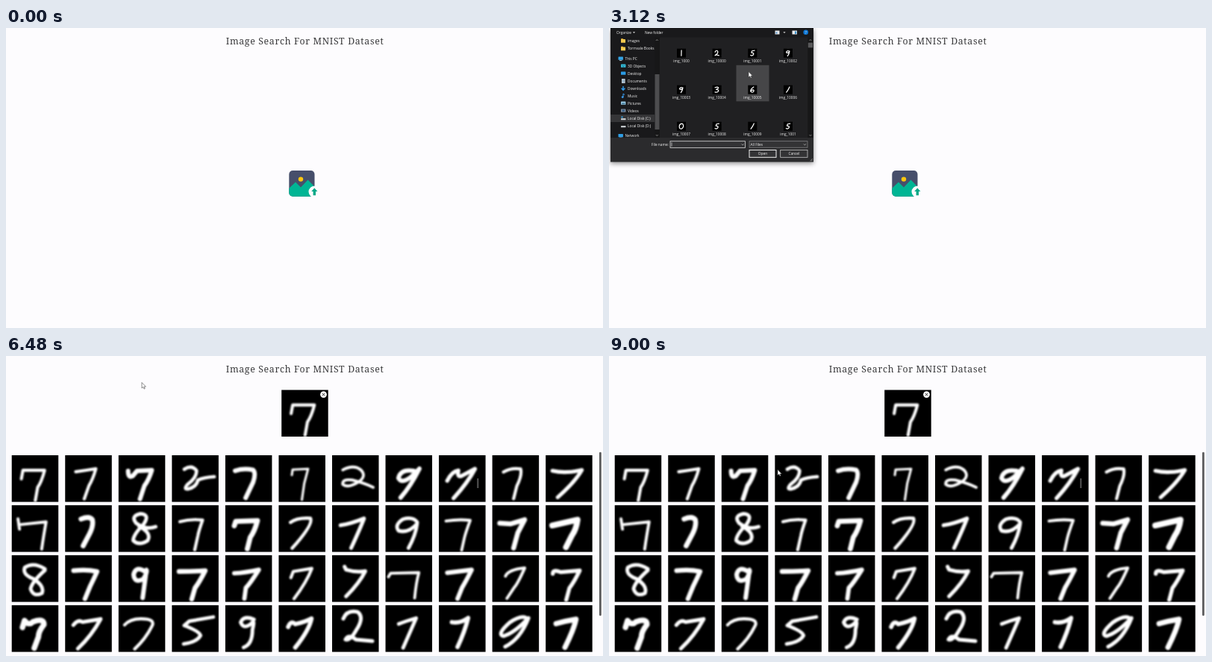
These frames come from a looping animation (800 by 402 pixels, 9560 ms). An HTML page:

```html
<!DOCTYPE html>
<html lang="en">
<head>
<meta charset="utf-8">
<title>Image Search</title>
<style>
html, body { margin: 0; width: 100%; height: 100%; overflow: hidden; background: #fdfcfe; }
svg { display: block; width: 100%; height: 100%; }
.title { font: 12.3px "Noto Serif", serif; letter-spacing: .67px; fill: #3a3a3c; text-anchor: middle; }
.ui { font: 4.8px "Open Sans", sans-serif; fill: #efefef; }
.mid { text-anchor: middle; }
.ink { fill: none; stroke: #fff; stroke-linecap: round; stroke-linejoin: round; }
.soft { filter: blur(.85px); }
#dialog { filter: drop-shadow(0 2px 3px rgba(0,0,0,.45)); }
</style>
</head>
<body>
<svg viewBox="0 0 800 402" preserveAspectRatio="none">
  <defs>
    <clipPath id="sideClip"><rect x="2" y="12" width="66" height="135"/></clipPath>
    <clipPath id="listClip"><rect x="68" y="12.5" width="198" height="134.5"/></clipPath>
    <clipPath id="gridClip"><rect x="0" y="128.3" width="794" height="271"/></clipPath>
    <clipPath id="iconClip"><rect x="379.3" y="191" width="34.2" height="34.8" rx="5"/></clipPath>
  </defs>
  <rect width="800" height="402" fill="#fdfcfe"/>
  <text class="title" x="400.6" y="22.4">Image Search For MNIST Dataset</text>

  <g id="upload">
    <g clip-path="url(#iconClip)">
      <rect x="379" y="191" width="35" height="35" fill="#474f6b"/>
      <path d="M379 215L388 206.5L395 213.5L404.5 203.5L414 213V226H379Z" fill="#00b594"/>
    </g>
    <circle cx="395" cy="202.6" r="3.2" fill="#ffc70f"/>
    <circle cx="413.3" cy="219.6" r="7.8" fill="#fdfcfe"/>
    <path d="M413.3 214.4L417.4 219H415V224.2H411.6V219H409.2Z" fill="#00a887"/>
  </g>

  <g id="query">
    <g id="picked" transform="translate(369.2 45.5)"></g>
    <circle cx="425.5" cy="51.6" r="4.4" fill="#fff"/>
    <path d="M423.8 49.9l3.4 3.4m0-3.4l-3.4 3.4" stroke="#222" stroke-width="1"/>
  </g>

  <g id="results">
    <g clip-path="url(#gridClip)"><g id="grid"></g></g>
    <rect id="thumb" x="795" width="2.8" height="219.5" rx="1.4" fill="#5c5c5e"/>
  </g>

  <g id="dialog">
    <rect x="2" y="0" width="272" height="179.5" fill="#2b2b2d"/>
    <rect x="2" y="0" width="272" height="147" fill="#19191b"/>
    <rect x="68" y="12.5" width="206" height="134.5" fill="#202022"/>
    <g id="chrome"></g>
    <g id="side" clip-path="url(#sideClip)"></g>
    <g clip-path="url(#listClip)">
      <rect id="hover" width="44" height="48.5"/>
      <g id="files"></g>
    </g>
    <path id="caret" d="M84 153.3v5.4" stroke="#fff" stroke-width=".6"/>
  </g>

  <path id="cursor" d="M0 0V7.6L1.8 6L3 8.6L4.2 8.1L3.1 5.6H5.4Z" fill="#fff" stroke="#333" stroke-width=".55"/>
</svg>
<script>
const LOOP = 9560, ROW = 49, COL = 47.65, SCROLL = 64, TILE = 62.5;
const $ = id => document.getElementById(id);

function add(parent, tag, attrs, text) {
  const el = document.createElementNS("http://www.w3.org/2000/svg", tag);
  for (const k in attrs) el.setAttribute(k, attrs[k]);
  if (text) el.textContent = text;
  parent.appendChild(el);
  return el;
}
const box = (p, x, y, width, height, fill, more) => add(p, "rect", { x, y, width, height, fill, ...more });
const label = (p, x, y, text, cls = "ui") => add(p, "text", { x, y, class: cls }, text);
const line = (p, d, stroke = "#ddd", w = .7) => add(p, "path", { d, stroke, fill: "none", "stroke-width": w });
const ink = (p, d, w) => add(p, "path", { d, class: "ink", "stroke-width": w });
const move = (el, x, y) => el.setAttribute("transform", `translate(${x} ${y})`);
const show = (el, on) => { el.style.display = on ? "" : "none"; };

// Handwriting: stroke width, then path.
const rows = [
  ["4 M14 30L16 19L44 19Q40 34 35 41L32 58",
   "4 M18 22Q32 20 44 18Q40 32 35 40L29 57",
   "6 M14 20Q14 30 20 27L26 20L46 19Q42 32 36 40L30 58",
   "5 M16 20Q27 13 34 22Q34 33 21 42Q14 50 22 49Q34 46 36 36Q44 32 60 31",
   "6 M14 21Q26 17 38 20Q42 24 38 36L28 57",
   "3 M20 27L21 20L41 19L36 38L33 59",
   "4 M13 22Q28 14 38 22Q46 30 36 38Q20 48 13 42Q12 34 26 36Q42 40 55 46",
   "6 M40 21Q22 18 19 31Q24 40 38 28L48 18Q36 42 22 58",
   "5 M12 34Q18 22 26 21Q24 30 30 28L47 19Q38 36 20 56",
   "4 M18 24Q28 18 40 20Q42 28 35 42L31 58",
   "5 M11 22Q28 26 50 21Q40 38 18 57"],
  ["4 M9 18L11 32M10 26L47 22Q44 38 41 59",
   "7 M24 17Q36 12 40 18Q42 26 36 38L27 55",
   "5 M53 31Q40 36 26 26Q18 16 32 13Q46 14 36 28Q22 42 22 50Q30 58 42 50Q48 40 30 30",
   "4 M12 22Q26 18 41 20Q36 34 35 40L31 58",
   "7 M14 26L16 20L46 19Q42 34 36 42L32 58",
   "4 M20 24Q28 18 44 19Q48 26 22 55",
   "5 M14 24Q28 22 45 15Q40 28 28 54",
   "5 M46 22Q40 14 26 18Q14 26 20 34Q34 38 46 24Q44 40 34 58",
   "4 M10 19Q28 16 44 18Q38 34 36 42L32 60",
   "7 M10 22L26 23L46 17L36 36L30 58",
   "8 M11 26L46 18Q44 32 38 40L30 56"],
  ["5 M46 20Q30 10 18 18Q14 28 30 34Q46 44 42 54Q30 60 26 48Q28 38 46 22",
   "6 M13 20Q30 18 44 21Q40 30 35 40L28 57",
   "6 M36 22Q24 14 21 26Q22 38 34 32Q40 22 38 20L33 57",
   "6 M14 21Q32 21 47 20Q40 34 34 42L30 56",
   "6 M14 22Q30 21 48 17Q36 36 30 42L28 57",
   "4 M18 30L21 22L45 18Q38 36 22 57",
   "5 M18 16L20 20Q34 24 46 22Q38 38 20 56",
   "4 M3 28L6 23L46 22Q42 36 40 58",
   "6 M13 22L46 18Q38 34 33 42L27 57",
   "4 M20 27Q24 18 46 16Q36 38 32 42L22 57",
   "5 M12 24Q12 18 22 22L46 20Q38 36 33 42L29 57"],
  ["8 M15 28L18 18Q24 26 30 20Q46 14 46 24Q38 34 38 42L32 58",
   "5 M14 26Q20 18 26 22L50 18Q38 40 20 57",
   "4 M11 26Q18 18 32 18Q52 18 46 28Q38 44 24 57",
   "5 M58 16L24 22L17 28Q38 36 40 42Q34 52 16 54",
   "5 M40 20Q26 14 22 24Q26 34 36 26Q42 18 38 34Q38 54 26 58",
   "6 M14 28Q18 18 24 24Q40 20 47 16Q44 32 24 57",
   "5 M13 24Q18 12 32 15Q42 22 30 40Q22 54 16 52Q20 44 30 52L52 54",
   "5 M22 24Q32 20 46 16Q38 34 28 57",
   "6 M20 22Q32 24 43 16Q38 36 28 57",
   "5 M50 20Q44 12 26 24Q8 40 18 42Q32 38 51 18Q40 46 20 56",
   "7 M18 24Q32 20 45 18Q42 32 30 56"],
  ["7 M14 18Q14 34 24 32Q38 28 42 18L36 40L34 57",
   "7 M14 22Q34 20 46 18Q38 36 28 57",
   "4 M20 22L46 20Q40 32 24 56",
   "7 M11 24Q24 28 48 22Q38 36 22 56",
   "5 M22 24Q34 18 40 22Q38 36 26 56",
   "6 M16 30Q22 14 38 20Q48 28 30 44L18 55"]
];

// Data set rule: fit the digit in 20/28 of the tile, centred on its mass.
function drawDigit(p, spec) {
  const cut = spec.indexOf(" "), w = +spec.slice(0, cut);
  const path = ink(p, spec.slice(cut + 1), w);
  const b = path.getBBox(), length = path.getTotalLength(), samples = 60;
  const scale = TILE * 20 / 28 / (Math.max(b.width, b.height) + w);
  let mx = 0, my = 0;
  for (let i = 0; i < samples; i++) {
    const pt = path.getPointAtLength((i + .5) / samples * length);
    mx += pt.x / samples;
    my += pt.y / samples;
  }
  path.setAttribute("transform",
    `translate(${TILE / 2 - scale * mx} ${TILE / 2 - scale * my}) scale(${scale})`);
}

function drawTile(g, spec) {
  box(g, 0, 0, TILE, TILE, "#000");
  drawDigit(add(g, "g", { class: "soft" }), spec);
}

rows.forEach((row, r) => row.forEach((spec, c) => {
  const g = add($("grid"), "g", {});
  move(g, 7.7 + 71.55 * c, 133 + 67 * r);
  drawTile(g, spec);
}));
line($("grid"), "M632.3 164v13", "#555", 2);
drawTile($("picked"), rows[0][0]);

// Thumbnails in the file list
const numerals = {
  "/": "M42 12Q34 32 20 50",
  0: "M34 13Q16 16 17 36Q20 54 34 49Q50 38 44 20Q42 13 34 13",
  1: "M32 12L31 50",
  2: "M18 24Q24 10 36 16Q44 28 22 46Q14 52 24 42L46 48",
  3: "M18 16Q40 8 42 18Q40 27 26 30Q46 30 42 42Q34 54 18 48",
  5: "M46 13L28 16L24 29Q44 28 38 42Q30 54 18 46",
  6: "M40 12Q18 26 18 42Q24 54 38 46Q46 34 34 32Q24 34 20 43",
  7: "M16 26L17 17H46Q40 32 32 52",
  8: "M44 15Q24 10 22 20Q24 27 36 33Q42 46 30 51Q18 50 26 36Q46 26 44 15",
  9: "M42 18Q26 10 19 24Q22 36 40 24L42 18Q40 36 28 52"
};

function fileSet(names, digits) {
  const g = add($("files"), "g", {});
  names.forEach((n, i) => {
    const item = add(g, "g", {});
    move(item, 97 + COL * (i % 4), 48.5 + ROW * Math.floor(i / 4));
    box(item, -6, -6, 12, 12, "#000");
    const pic = ink(item, numerals[digits[i]], 6.5);
    pic.setAttribute("transform", "translate(-6 -6) scale(.19)");
    label(item, 0, 12.5, "img_" + n, "ui mid");
  });
  return g;
}
const byText = fileSet([0, 1, 10, 100, 1000, 10000, 10001, 10002, 10003, 10004, 10005, 10006,
  10007, 10008, 10009, 1001], "/089" + "1259" + "936/" + "05/5");
const byNumber = fileSet([...Array(16).keys()], "/021" + "0073" + "5389" + "133/");

// Sidebar: name, y, icon colour, indent
const places = [
  ["images", 17, "#f4c94f"], ["Tormvale Books", 27.5, "#f4c94f"], ["This PC", 41, "#35a5e6", -3.5],
  ["3D Objects", 51, "#37c0dc"], ["Desktop", 61, "#2b9be4"], ["Documents", 71, "#b9c6d0"],
  ["Downloads", 81, "#2f9df0"], ["Music", 91, "#3a9cf0"], ["Pictures", 101, "#9ccbe4"],
  ["Videos", 111, "#7d8b9c"], ["Local Disk (C:)", 121, "#c3c7ca"], ["Local Disk (D:)", 131, "#c3c7ca"],
  ["Network", 144.5, "#2f9fe6", -3.5]
];
function drawSide() {
  const s = $("side");
  box(s, 2, 116, 59, 10, "#353537");
  for (const [name, y, color, dx = 0] of places) {
    const x = 16 + dx;
    if (name === "Downloads") line(s, `M${x + 3} ${y - 3}v5m-2.4-2.2l2.4 2.4l2.4-2.4`, color, 1.4);
    else if (name === "Music") {
      line(s, `M${x + 3} ${y + 1.5}v-4.5l2 1.5`, color, 1);
      add(s, "circle", { cx: x + 2.2, cy: y + 1.6, r: 1.4, fill: color });
    } else if (name.startsWith("Local")) {
      box(s, x, y, 6.5, 2.3, color, { rx: .5 });
      if (name.includes("C:")) box(s, x + .5, y - 2.6, 2, 2, "#35a5e6");
    } else if (name === "Documents") {
      box(s, x + 1, y - 3, 4.6, 6, color);
      line(s, `M${x + 2} ${y - 1}h2.6m-2.6 2h2.6`, "#4b86b8", .6);
    } else if (color === "#f4c94f") {
      box(s, x, y - 2.8, 3, 2, "#d9a52e");
      box(s, x, y - 2, 6, 4.8, color, { rx: .4 });
    } else {
      box(s, x, y - 2.5, 6.4, 4.3, color, { rx: .4 });
      if (dx) box(s, x + 1.5, y + 2.2, 3.4, .8, "#c5d5df");
      if (name === "Pictures") box(s, x + 1, y - .5, 4.4, 1.6, "#3f7795");
      if (name === "3D Objects") line(s, `M${x + 1} ${y - 1}l2.2 1l2.2-1m-2.2 1v2`, "#14708a", .7);
      if (name === "Videos") box(s, x + 1.5, y - 1.5, 3.4, 2.4, "#345d86");
    }
    label(s, 25 + dx, y + 1.8, name);
  }
  box(s, 61, 12.5, 7, 135, "#171718");
  box(s, 61.5, 62, 6, 74, "#4d4d4f");
  line(s, "M62.8 17l1.5-1.5l1.5 1.5M62.8 143l1.5 1.5l1.5-1.5", "#aaa");
}

function drawChrome() {
  const c = $("chrome");
  const down = (x, y) => add(c, "path", { d: `M${x - 1.6} ${y - .8}h3.2l-1.6 1.8z`, fill: "#ddd" });
  label(c, 10, 7.6, "Organize");
  down(33.5, 6);
  label(c, 48, 7.6, "New folder");
  box(c, 222.5, 3.5, 6, 5, "#e4e7ea");
  box(c, 223.5, 5.5, 2, 2, "#4c8cc5");
  down(235, 6);
  box(c, 245.5, 3.5, 6.5, 5, "#e8eaec");
  box(c, 249, 4.5, 2.3, 3.4, "#3d93cd");
  add(c, "circle", { cx: 263.7, cy: 5.8, r: 3.3, fill: "#0d78d7" });
  label(c, 263.7, 7.6, "?", "ui mid");
  box(c, 266.3, 12.5, 7.2, 134.5, "#171718");
  box(c, 266.8, 19.7, 6.3, 6.6, "#58585a");
  line(c, "M268.4 17l1.5-1.5l1.5 1.5M268.4 143l1.5 1.5l1.5-1.5", "#aaa");
  label(c, 57, 157.6, "File name:");
  box(c, 82, 151.7, 100.5, 8.8, "#333335", { stroke: "#d8d8d8", "stroke-width": .8 });
  line(c, "M177.8 155.5l1.4 1.4l1.4-1.4");
  box(c, 188, 151.7, 78, 8.5, "#333335", { stroke: "#8c8c8e", "stroke-width": .7 });
  label(c, 189.5, 157.6, "All Files");
  line(c, "M261 155.5l1.4 1.4l1.4-1.4");
  box(c, 188, 163.5, 36, 9.8, "#333335", { stroke: "#f2f2f2", "stroke-width": 1 });
  label(c, 206, 170.2, "Open", "ui mid");
  box(c, 229.7, 163.5, 36.3, 9.8, "#333335", { stroke: "#c4c4c4", "stroke-width": .8 });
  label(c, 247.8, 170.2, "Cancel", "ui mid");
  line(c, "M269.5 178.3l3.2-3.2m-1.4 3.2l1.4-1.4", "#999", .8);
}
drawSide();
drawChrome();

// Time tracks
const pointer = [[120, 396, 211], [900, 165.5, 97.5], [1080, 165.5, 97.5], [2000, 196, 84],
  [2080, 196, 84], [3000, 187, 58.5], [3880, 187, 58.5], [4440, 98, 72], [4800, 182, 35.5],
  [6480, 182, 35.5], [7000, 225, 156], [8000, 225, 156], [8240, 226, 152.3]];
const hovers = [[0, -1, 0], [1480, 2, 1], [4100, 1, 1], [4280, 0, 1], [4920, 1, 0], [5200, 2, 0], [5480, -1, 0]];
const scrolls = [[0, 0], [7400, 42], [7480, 58], [7520, 64], [8000, 50], [8080, 24], [8160, 7], [8240, 0]];

const held = (track, t) => track.filter(k => k[0] <= t).pop() || track[0];

function glide(track, t) {
  const i = track.findIndex(k => k[0] > t);
  if (i === 0) return track[0].slice(1);
  if (i < 0) return track[track.length - 1].slice(1);
  const a = track[i - 1], b = track[i];
  const u = (t - a[0]) / (b[0] - a[0]), e = u * u * (3 - 2 * u);
  return [1, 2].map(n => a[n] + (b[n] - a[n]) * e);
}

function render(t) {
  show($("dialog"), t >= 120 && t < 5480);
  show($("upload"), t < 5600);
  show($("query"), t >= 5640);
  show($("results"), t >= 6240);
  show($("cursor"), t >= 120);
  move($("cursor"), ...glide(pointer, t));

  const sorted = t >= 3480;
  show(byText, !sorted);
  show(byNumber, sorted);
  move($("files"), 0, t >= 1480 ? -SCROLL + .2 : 0);

  const [, col, row] = held(hovers, t);
  show($("hover"), col >= 0);
  move($("hover"), 75.2 + COL * col, .8 + ROW * row);
  $("hover").setAttribute("fill", t >= 5320 ? "#68686a" : "#464648");
  show($("caret"), Math.floor((t - 740) / 530) % 2 === 0);

  const y = held(scrolls, t)[1];
  move($("grid"), 0, -y);
  $("thumb").setAttribute("y", 128.7 + y * 220 / 272);
}

const start = performance.now();
function tick() {
  render((performance.now() - start) % LOOP);
  requestAnimationFrame(tick);
}
tick();
</script>
</body>
</html>
```
